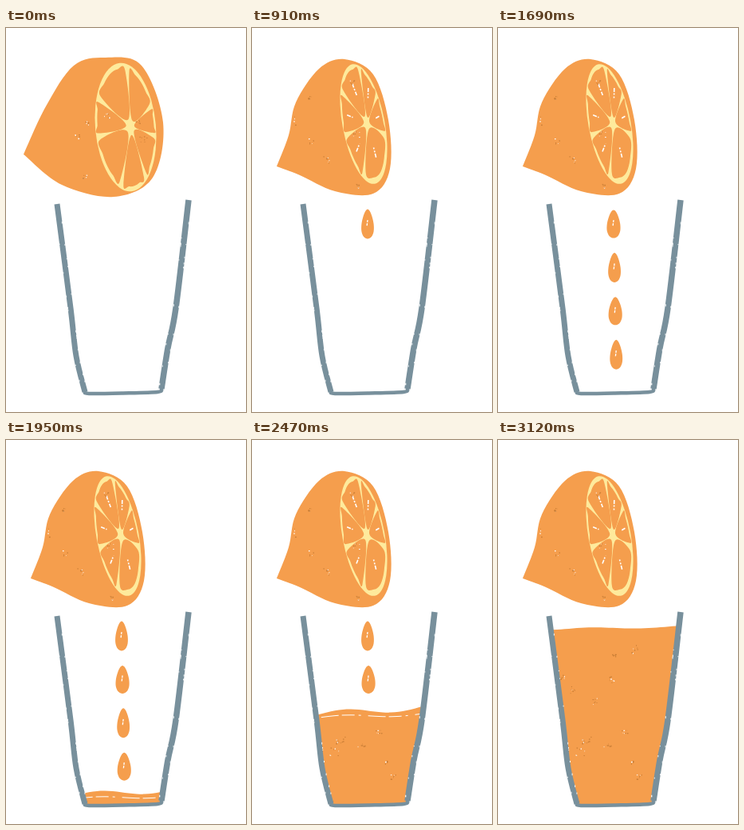
Recreate the animation shown at these times as an HTML page with a canvas. Size 301x480 px, loop 3.51 s.

```html
<!DOCTYPE html>
<html lang="en">
<head>
<meta charset="utf-8">
<title>Squeezed orange</title>
<style>
html, body { margin: 0; width: 100%; height: 100%; overflow: hidden; background: #fff; }
canvas { display: block; width: 100vw; height: 100vh; }
</style>
</head>
<body>
<canvas id="stage" width="301" height="480"></canvas>
<script>
const ctx = document.getElementById('stage').getContext('2d');
const ORANGE = '#f59e4d', PITH = '#feea9c', GLASS = '#78909c', BROWN = '#c67c35', WHITE = '#fff';
const LOOP = 3510, HOLD = 520, STEP = 130;
const FIRST_DROP = 3, DROPS = 8, FILL_STEP = 11;
const DROP_TOP = 245, FALL = 27.2, FULL = 235, RISE = 25.5;

const points = text => text.split(' ').map(p => p.split(',').map(Number));
const mix = (a, b, f) => [a[0] + (b[0] - a[0]) * f, a[1] + (b[1] - a[1]) * f];

// Smooth path (Catmull-Rom) through a few key points
function curve(pts, closed = false) {
  const path = new Path2D(), n = pts.length;
  const at = i => closed ? pts[(i + n) % n] : pts[Math.max(0, Math.min(n - 1, i))];
  path.moveTo(...pts[0]);
  for (let i = 0; i < (closed ? n : n - 1); i++) {
    const [a, b, c, d] = [at(i - 1), at(i), at(i + 1), at(i + 2)];
    path.bezierCurveTo(b[0] + (c[0] - a[0]) / 6, b[1] + (c[1] - a[1]) / 6,
      c[0] - (d[0] - b[0]) / 6, c[1] - (d[1] - b[1]) / 6, c[0], c[1]);
  }
  if (closed) path.closePath();
  return path;
}

function random(seed) {
  return () => (seed = (seed * 16807) % 2147483647) / 2147483647;
}

function fill(path, color) {
  ctx.fillStyle = color;
  ctx.fill(path);
}

function stroke(path, color, width, dash = []) {
  ctx.strokeStyle = color;
  ctx.lineWidth = width;
  ctx.setLineDash(dash);
  ctx.stroke(path);
}

// Small groups of dry-brush specks scattered over a box
function specks(seed, groups, x, y, w, h) {
  const rnd = random(seed);
  for (let g = 0; g < groups; g++) {
    const cx = x + rnd() * w, cy = y + rnd() * h, spread = 4 + rnd() * 8;
    for (let i = 0; i < 7; i++) {
      ctx.fillStyle = rnd() < .3 ? WHITE : BROWN;
      ctx.fillRect(cx + (rnd() - .5) * spread, cy + (rnd() - .5) * spread, .6 + rnd(), .6 + rnd());
    }
  }
}

// One juicy wedge of the cut face: hub, then an arc, pulled in towards its middle
function wedge(onFace, from, to) {
  const hub = onFace(.18, 0), pts = [hub];
  for (let i = 0; i <= 4; i++) pts.push(onFace(.96, from + (to - from) * i / 4));
  const mid = [0, 1].map(k => pts.reduce((sum, p) => sum + p[k], 0) / pts.length);
  const scratch = [.22, .5].map(f => mix(mid, hub, f - .2));
  return { shape: curve(pts.map(p => mix(mid, p, .83)), true), scratch: curve(scratch) };
}

// The outline runs from the pointed tip round to the tip again.
function makeFruit(outline, [x, y, rx, ry, turn], walls, dry) {
  const pts = points(outline);
  const cos = Math.cos(turn), sin = Math.sin(turn);
  const onFace = (r, degrees) => {
    const a = degrees * Math.PI / 180, u = rx * r * Math.cos(a), v = ry * r * Math.sin(a);
    return [x + u * cos - v * sin, y + u * sin + v * cos];
  };
  const face = new Path2D();
  face.ellipse(x, y, rx, ry, turn, 0, Math.PI * 2);
  const wedges = walls.map((wall, i) => wedge(onFace, wall, walls[i + 1] ?? walls[0] + 360));
  return { body: curve([...pts, pts[0]]), face, wedges, dry };
}

const SEVEN = [-150, -76, -17, 10, 57, 109, 174], SIX = [-142, -72, -26, 14, 118, 172];
const whole = makeFruit('22,158 50,98 85,47 125,37 170,47 197,118 184,187 135,211 70,196',
  [150, 124, 38, 80.5, -.09], SEVEN, false);
const bent = makeFruit('23,165 37,143 47,97 72,56 112,39 147,46 175,103 185,160 165,200 128,212 78,200 55,184',
  [142, 120, 32, 76.5, -.22], SIX, true);
const squeezed = makeFruit('31,173 46,134 55,93 84,51 116,39 152,58 171,115 173,176 152,207 104,204 60,184',
  [140, 120, 26.5, 76, -.185], SIX, true);

function drawFruit({ body, face, wedges, dry }) {
  fill(body, ORANGE);
  ctx.save();
  ctx.clip(body);
  fill(face, PITH);
  for (const { shape, scratch } of wedges) {
    fill(shape, ORANGE);
    if (dry) stroke(scratch, WHITE, 1.6, [5, 1.5, 2, 2]);
  }
  specks(dry ? 41 : 7, 7, 50, 60, 130, 140);
  ctx.restore();
}

const left = points('64,220 81,350 88,410 99,455');
const base = points('99,455 104,457 145,456.5 190,455 195,451');
const right = points('195,451 203,400 213,350 229,215');
const inside = curve([...left, ...base.slice(1), ...right.slice(1)]);

function drawGlass() {
  ctx.lineCap = 'butt';
  stroke(curve(left), GLASS, 7);
  stroke(curve(right), GLASS, 7.5);
  ctx.lineCap = 'round';
  stroke(curve(base), GLASS, 4.5);
  ctx.lineCap = 'butt';
  const rnd = random(77);
  ctx.fillStyle = WHITE;
  for (let i = 0; i < 40; i++) {
    const side = i % 2 ? left : right, k = Math.floor(rnd() * 3);
    const [x, y] = mix(side[k], side[k + 1], rnd());
    ctx.fillRect(x + (rnd() < .5 ? -3.8 : 3), y, .9, 1 + rnd() * 2);
  }
}

function drawDrop(y, index) {
  const x = 145 + (y - DROP_TOP) / 50, w = 9.5 + index % 2 * .8, h = 18.5 - index % 2;
  const pts = [];
  for (let a = 0; a < 6.28; a += Math.PI / 6) {
    pts.push([x + w * Math.sin(a) * (.8 - .25 * Math.cos(a)), y - h * Math.cos(a)]);
  }
  fill(curve(pts, true), ORANGE);
  stroke(curve([[x, y - 5], [x - 1, y + 3]]), WHITE, 1.3, [3, 1]);
}

// The surface tilts and waves, and calms down as the glass gets full.
function drawJuice(level) {
  const calm = Math.min(1, .3 + (level - FULL) / 140), top = [];
  for (let x = 54; x <= 244; x += 10) {
    top.push([x, level + calm * (4 - (x - 84) * .07 - 4 * Math.sin((x - 84) / 20))]);
  }
  const juice = curve(top);
  juice.lineTo(244, 470);
  juice.lineTo(54, 470);
  ctx.save();
  ctx.clip(inside);
  fill(juice, ORANGE);
  ctx.clip(juice);
  specks(93, 14, 80, 250, 110, 200);
  if (level > FULL) {
    const shine = top.map(([x, y]) => [x, (y + level) / 2 + 6]);
    stroke(curve(shine), WHITE, 1, [16, 5, 3, 9, 22, 4]);
  }
  ctx.restore();
}

function draw(time) {
  const step = Math.floor((time - HOLD) / STEP);
  const level = Math.max(FULL, 441 - (step - FILL_STEP) * RISE);
  ctx.fillStyle = WHITE;
  ctx.fillRect(0, 0, 301, 480);
  drawFruit(step < 0 ? whole : step < 1 ? bent : squeezed);

  // A new drop leaves every second step and falls evenly until it meets the juice.
  for (let i = 0; i < DROPS; i++) {
    const age = step - FIRST_DROP - i * 2, y = DROP_TOP + age * FALL;
    if (age >= 0 && y < level) drawDrop(y, i);
  }
  if (step >= FILL_STEP) drawJuice(level);
  drawGlass();
}

const start = performance.now();
function tick() {
  draw((performance.now() - start) % LOOP);
  requestAnimationFrame(tick);
}
tick();
</script>
</body>
</html>
```
